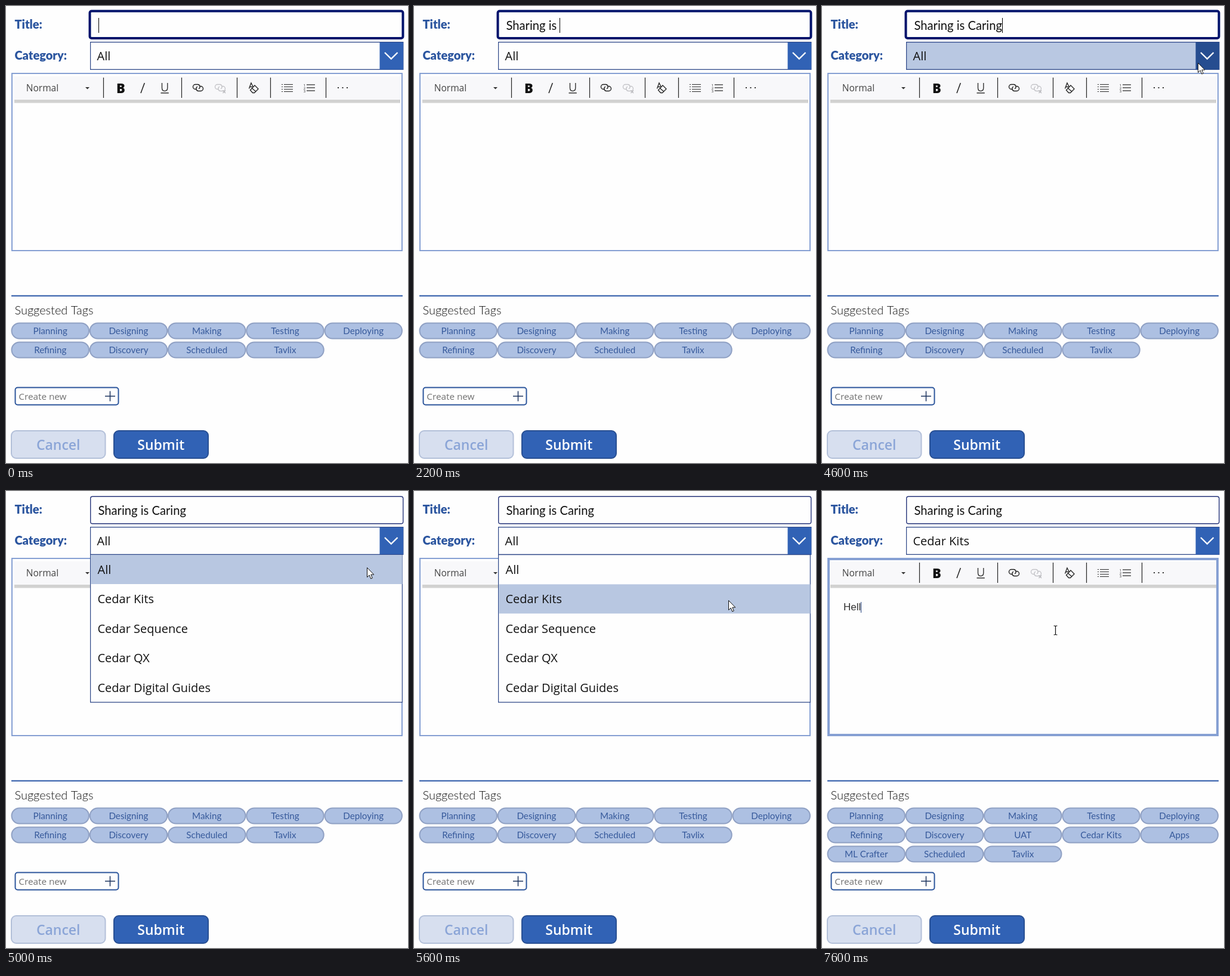
Animation of 674x766 px, one loop 8 s. Source, as an HTML page with a canvas:

```html
<!DOCTYPE html>
<html lang="en">
<head>
<meta charset="utf-8">
<title>New post form</title>
<style>
  html, body { margin: 0; width: 100%; height: 100%; overflow: hidden; background: #fefefe; }
  canvas { display: block; }
</style>
</head>
<body>
<canvas id="stage" width="674" height="766"></canvas>
<script>
const ctx = document.getElementById('stage').getContext('2d');
const LOOP = 8000, STEP = 200;
const LATO = 'Lato, sans-serif', OPEN = '"Open Sans", sans-serif';
const PAPER = '#fefefe', NAVY = '#00126b', BLUE = '#3162b5', INK = '#111';

const TITLE = 'Sharing is Caring';
const OPTIONS = ['All', 'Cedar Kits', 'Cedar Sequence', 'Cedar QX', 'Cedar Digital Guides'];
const TAGS = ['Planning', 'Designing', 'Making', 'Testing', 'Deploying', 'Refining', 'Discovery'];
const LAST_TAGS = ['Scheduled', 'Tavlix'];
const KIT_TAGS = ['UAT', OPTIONS[1], 'Apps', 'ML Crafter'];

const OPENED = 5000, PICKED = 5800, EDITING = 6600;
// time, x, y of the pointer
const PATH = [
  [4400, 598, 74], [4600, 630, 95], [4800, 630, 95], [5000, 605, 128], [5200, 557, 158],
  [5400, 530, 178], [5800, 523, 188], [6000, 527, 193], [6200, 500, 201], [6600, 391, 233]
];

function text(str, x, y, font, color, align = 'left') {
  ctx.font = font;
  ctx.fillStyle = color;
  ctx.textAlign = align;
  ctx.fillText(str, x, y);
  return ctx.measureText(str).width;
}

function fill(x, y, w, h, color) {
  ctx.fillStyle = color;
  ctx.fillRect(x, y, w, h);
}

// Outer bounds; the border lies inside them.
function box(x, y, w, h, r, line, border, back) {
  const half = line / 2;
  ctx.beginPath();
  ctx.roundRect(x + half, y + half, w - line, h - line, Math.max(0, r - half));
  if (back) { ctx.fillStyle = back; ctx.fill(); }
  ctx.lineWidth = line;
  ctx.strokeStyle = border;
  ctx.stroke();
}

function stroke(d, color = '#222', width = 1.3) {
  ctx.strokeStyle = color;
  ctx.lineWidth = width;
  ctx.stroke(new Path2D(d));
}

function drawTitle(t) {
  const active = t < OPENED;
  text('Title:', 14.5, 38, `900 20px ${LATO}`, '#2b559f');
  if (active) box(138.5, 6.5, 529, 49.5, 5, 4, NAVY, PAPER);
  else box(141, 8.5, 525.5, 47, 4, 1.4, '#26357a', PAPER);
  const typed = TITLE.slice(0, t / STEP);
  const w = text(typed, 154.5, 40, `20.2px ${LATO}`, INK);
  if (active) fill(Math.round(154.5 + w), 20, 1, 25, '#000');
}

function drawCategory(t) {
  const hover = t >= 4400 && t < OPENED;
  text('Category:', 14.5, 90, `900 20px ${LATO}`, '#2b559f');
  box(141, 60, 525.5, 47, 0, 1.2, '#2c4687', hover ? '#b9c8e2' : PAPER);
  fill(626.5, 61, 39.5, 45.5, hover ? '#264d90' : BLUE);
  stroke('M635 78 L645.8 88.5 L656.5 78', '#fff', 2.4);
  if (t >= PICKED && t < EDITING) box(138.5, 58, 529, 50, 0, 4, NAVY);
  text(OPTIONS[t < PICKED ? 0 : 1], 152.5, 91, `20px ${OPEN}`, INK);
}

function drawLink(x, color) {
  stroke(`M${x + 6} 139.5 H${x + 4.5} A4 4 0 0 1 ${x + 4.5} 131.5 H${x + 8.5} A4 4 0 0 1 ${x + 10} 139
    M${x + 12} 134.5 H${x + 13.5} A4 4 0 0 1 ${x + 13.5} 142.5 H${x + 9.5} A4 4 0 0 1 ${x + 8} 135`, color, 1.4);
}

function drawToolbar() {
  fill(14, 118, 647, 39, '#f8f8fa');
  fill(14, 157, 647, 5.5, '#d2d2d1');
  text('Normal', 33.8, 143, `15.5px ${OPEN}`, '#444');
  ctx.fillStyle = '#333';
  ctx.fill(new Path2D('M133 136 H140 L136.5 139.5 Z'));
  for (const x of [163.5, 294.5, 387.5, 443.5, 536.5]) stroke(`M${x} 120 V154`, '#222', 1.2);

  text('B', 192.3, 145.5, `800 22px ${OPEN}`, INK, 'center');
  stroke('M232.3 129 L226 146', '#222', 1.5);
  stroke('M261.5 129 V137 Q261.5 142.5 266 142.5 Q270.8 142.5 270.8 137 V129 M259.5 145.7 H272.8', '#333', 1.4);

  drawLink(313, '#222');
  drawLink(350, '#c5c5c9');
  stroke('M363.5 141.5 L368 146 M368 141.5 L363.5 146', '#b5b5b9', 1.2);

  stroke('M407.5 138.5 L411 129 L414.5 136 M408.8 135.5 H413');
  stroke('M417 133 L423 139 L416.5 145.5 H413.5 L409.5 141 Z M412.3 137.8 L419 143.5');

  for (let i = 0; i < 4; i++) {
    const y = 131.5 + i * 4;
    stroke(`M462 ${y} H464 M466 ${y} H481`, '#333', 1.1);
  }
  for (let i = 0; i < 3; i++) {
    const y = 132 + i * 5;
    stroke(`M504 ${y} H518`, '#333', 1.3);
    text(i + 1, 498.7, y + 2.5, `6px ${OPEN}`, '#222');
  }
  for (const x of [556, 563.5, 571]) fill(x, 136, 2, 2, '#333');
}

function drawEditor(t) {
  const active = t >= EDITING;
  box(9, 112, 656, 299, 0, active ? 4 : 2, '#86a0d3', PAPER);
  drawToolbar();
  if (!active) return;
  const count = t < 6800 ? 0 : t < 7200 ? 1 : 2 + (t - 7200) / STEP;
  const w = text('Hell'.slice(0, count), 36, 200, '17px "Liberation Sans", sans-serif', '#333');
  fill(Math.round(36 + w), 186, 1, 18, '#23407c');
}

function drawMenu(t) {
  if (t < OPENED || t >= PICKED) return;
  box(141, 106, 524, 248.7, 0, 1.2, '#2c4687', PAPER);
  fill(142, 107 + (t < 5400 ? 0 : 49.4), 522.5, 49, '#b8c7e1');
  OPTIONS.forEach((name, i) => text(name, 153.5, 139 + i * 49.4, `20px ${OPEN}`, INK));
}

function drawTags(t) {
  fill(9, 484.7, 656, 2.2, '#3a63ad');
  text('Suggested Tags', 14.5, 517, `300 20px ${LATO}`, INK);
  const tags = [...TAGS, ...(t < PICKED ? [] : KIT_TAGS), ...LAST_TAGS];
  tags.forEach((tag, i) => {
    const x = 8.5 + (i % 5) * 131.25, y = 530.5 + Math.floor(i / 5) * 32;
    box(x, y, 131.5, 28, 14, 2, '#90a1c4', '#adc0e2');
    text(tag, x + 65.7, y + 19.5, `15.2px ${LATO}`, '#36599b', 'center');
  });
}

function drawActions() {
  box(14.5, 638.5, 175, 31, 5, 2, '#2d569c', PAPER);
  text('Create new', 21.3, 660, `15.3px ${OPEN}`, '#707070');
  stroke('M166 654 H183 M174.5 645.5 V662.5', '#1d345f', 1.5);
  box(8, 711, 159.5, 48, 9, 2, '#b3c0d9', '#d7dfef');
  text('Cancel', 87.7, 743.5, `600 23px ${OPEN}`, '#8ba5d7', 'center');
  box(180, 711, 160, 48, 9, 2, '#284f93', BLUE);
  text('Submit', 259.8, 743.5, `600 23px ${OPEN}`, '#fff', 'center');
}

function pointerAt(t) {
  const next = PATH.findIndex(key => key[0] > t);
  if (next < 0) return PATH[PATH.length - 1].slice(1);
  const [t0, x0, y0] = PATH[next - 1], [t1, x1, y1] = PATH[next];
  const k = (t - t0) / (t1 - t0);
  return [x0 + (x1 - x0) * k, y0 + (y1 - y0) * k];
}

function drawPointer(t) {
  if (t < PATH[0][0]) return;
  const [x, y] = pointerAt(t);
  ctx.save();
  ctx.translate(Math.round(x) + 0.5, Math.round(y) + 0.5);
  if (t >= PICKED) {
    stroke('M-3 -7.5 H-1 L0 -6.5 L1 -7.5 H3 M0 -6.5 V6.5 M-3 7.5 H-1 L0 6.5 L1 7.5 H3', '#111', 1.2);
  } else {
    const arrow = 'M0 0 V16 L3.7 12.5 L6.2 18.5 L8.8 17.4 L6.3 11.6 H11.3 Z';
    ctx.fillStyle = '#fff';
    ctx.fill(new Path2D(arrow));
    stroke(arrow, '#111', 1);
  }
  ctx.restore();
}

function draw(now) {
  const t = Math.floor((now % LOOP) / STEP) * STEP;
  fill(0, 0, 674, 766, PAPER);
  drawEditor(t);
  drawTitle(t);
  drawCategory(t);
  drawMenu(t);
  drawTags(t);
  drawActions();
  drawPointer(t);
}

const start = performance.now();
function tick() {
  draw(performance.now() - start);
  requestAnimationFrame(tick);
}
tick();
</script>
</body>
</html>
```
